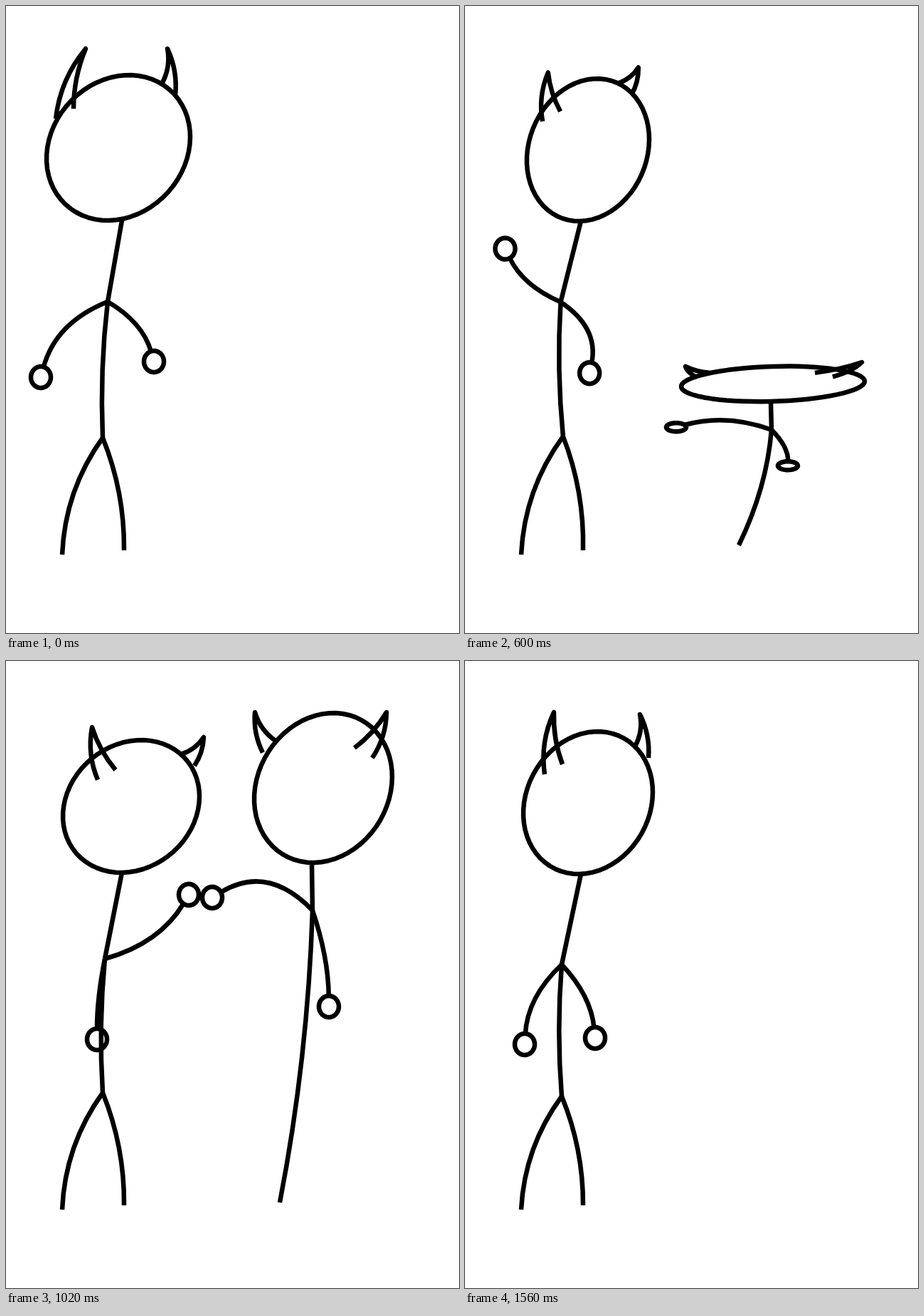
Animation of 637x880 px, one loop 1.62 s. Source, as an HTML page with a canvas:

```html
<!DOCTYPE html>
<html lang="en">
<head>
<meta charset="utf-8">
<title>Fist bump</title>
<style>
  html, body { margin: 0; width: 100%; height: 100%; overflow: hidden; background: #fff; }
  canvas { display: block; }
</style>
</head>
<body>
<canvas id="stage" width="637" height="880"></canvas>
<script>
const ctx = document.getElementById('stage').getContext('2d');
const LOOP = 1620, STEP = 60, FLOOR = 760, LEAN = 0.15;

const linear = k => k;
const snap = k => k ** 5;
const settle = k => 1 - (1 - k) ** 2;

// head: centre, radii. Horns: tip, base x. Arms: hand position, bend.
const puncher = {
  facing: 1, neck: 163, feet: [[79, 770, -0.15], [166, 764, 0.1]],
  keys: [
    { at: 0, ease: linear, head: [158, 199, 101, 102], backHorn: [112, 60, 70], frontHorn: [227, 60, 219],
      shoulder: [143, 415], hip: [136, 606], armA: [49, 521, -0.25], armB: [208, 499, 0.2] },
    { at: 240, ease: linear, head: [166, 200, 93, 99], backHorn: [109, 87, 102], frontHorn: [240, 80, 224],
      shoulder: [139, 415], hip: [137, 604], armA: [26, 349, 0.32], armB: [174, 518, 0.3] },
    { at: 420, ease: snap, head: [173, 202, 86, 100], backHorn: [116, 94, 108], frontHorn: [245, 87, 216],
      shoulder: [134, 416], hip: [138, 604], armA: [50, 341, 0.2], armB: [177, 515, 0.35] },
    { at: 780, ease: settle, head: [171, 202, 88, 100], backHorn: [142, 75, 143], frontHorn: [207, 63, 187],
      shoulder: [150, 400], hip: [135, 606], armA: [257, 328, -0.2], armB: [118, 521, -0.06] },
    { at: 1020, ease: linear, head: [176, 204, 96, 93], backHorn: [121, 93, 129], frontHorn: [278, 107, 246],
      shoulder: [139, 418], hip: [136, 606], armA: [257, 328, -0.2], armB: [128, 531, -0.05] },
    { at: 1320, ease: linear, head: [172, 199, 91, 97], backHorn: [138, 77, 125], frontHorn: [250, 73, 230],
      shoulder: [139, 402], hip: [131, 606], armA: [203, 495, -0.05], armB: [164, 520, 0.1] },
    { at: 1560, ease: linear, head: [173, 199, 91, 100], backHorn: [125, 72, 112], frontHorn: [246, 75, 239],
      shoulder: [136, 426], hip: [136, 611], armA: [84, 538, -0.2], armB: [183, 529, 0.17] }
  ]
};
const visitor = {
  facing: -1, neck: 430, feet: [],
  keys: [
    { at: 780, ease: settle, head: [433, 186, 129, 62], backHorn: [558, 110, 517], frontHorn: [310, 125, 345],
      shoulder: [431, 347], hip: [385, 752], armA: [297, 338, -0.4], armB: [454, 473, 0.1] },
    { at: 1020, ease: linear, head: [446, 178, 97, 105], backHorn: [535, 72, 515], frontHorn: [350, 72, 380],
      shoulder: [431, 350], hip: [385, 760], armA: [290, 332, -0.4], armB: [454, 485, 0.08] },
    { at: 1320, ease: linear, head: [440, 195, 125, 73], backHorn: [600, 120, 541], frontHorn: [311, 130, 358],
      shoulder: [432, 342], hip: [392, 719], armA: [338, 271, 0.32], armB: [523, 266, -0.33] }
  ]
};

function poseAt(keys, t) {
  const next = keys.findIndex(key => key.at > t);
  if (next <= 0) return keys.at(next);
  const from = keys[next - 1], to = keys[next];
  const k = from.ease((t - from.at) / (to.at - from.at));
  const pose = {};
  for (const part in from) {
    if (Array.isArray(from[part])) pose[part] = from[part].map((v, i) => v + (to[part][i] - v) * k);
  }
  return pose;
}

// Strokes a path with an even pen, even when the figure is stretched.
function ink(build, width = 6.5) {
  ctx.beginPath();
  build();
  ctx.save();
  ctx.resetTransform();
  ctx.lineWidth = width;
  ctx.stroke();
  ctx.restore();
}

const line = (...points) => ink(() => points.forEach(p => ctx.lineTo(...p)));

function oval(cx, cy, rx, ry, lean = 0) {
  ink(() => {
    for (let a = 0; a < 2 * Math.PI; a += 0.1) {
      ctx.lineTo(cx + rx * Math.cos(a), cy + ry * Math.sin(a - lean));
    }
    ctx.closePath();
  });
}

// Points along a bowed path: start, control and end, stopping short of the end if asked.
function bow([x0, y0], [x1, y1], bend, short = 0) {
  const dx = x1 - x0, dy = y1 - y0;
  const cx = x0 + dx / 2 + bend * dy, cy = y0 + dy / 2 - bend * dx;
  const k = short / Math.hypot(x1 - cx, y1 - cy);
  return [x0, y0, cx, cy, x1 + (cx - x1) * k, y1 + (cy - y1) * k];
}

function limb(...args) {
  const [x, y, ...rest] = bow(...args);
  ink(() => {
    ctx.moveTo(x, y);
    ctx.quadraticCurveTo(...rest);
  });
}

function arm(shoulder, [x, y, bend]) {
  limb(shoulder, [x, y], bend, 14);
  oval(x, y, 14, 15);
}

function horn(start, tip, end, bendUp, bendDown) {
  const up = bow(start, tip, bendUp), down = bow(tip, end, bendDown);
  ink(() => {
    ctx.moveTo(...start);
    ctx.quadraticCurveTo(...up.slice(2));
    ctx.quadraticCurveTo(...down.slice(2));
  });
}

function horns({ head: [cx, cy, rx, ry], backHorn: [bx, by, backBase], frontHorn: [fx, fy, base] }, side) {
  const backY = cy - 0.4 * ry;
  horn([backBase, backY], [bx, by], [backBase + 25 * side, backY - 14], 0.15 * side, -0.1 * side);
  const edgeY = cy - ry * Math.sin(Math.acos((base - cx) / rx) + LEAN);
  horn([base, edgeY], [fx, fy], [base + 19 * side, edgeY + 16], -0.18 * side, 0.14 * side);
}

function drawFigure({ facing, neck, feet, keys }, t) {
  const pose = poseAt(keys, t);
  const { head, shoulder, hip, armA, armB } = pose;
  oval(...head, LEAN);
  horns(pose, facing);
  line([neck, head[1] + head[3]], shoulder);
  limb(shoulder, hip, -0.04 * facing);
  arm(shoulder, armA);
  arm(shoulder, armB);
  feet.forEach(([x, y, bend]) => limb(hip, [x, y], bend));
}

// The visitor springs up from the floor and later shoots off the top.
function drawVisitor(t) {
  const rise = t < 780 ? 0.4 + 0.7 * (t - 600) / 120 : 1;
  const leave = Math.max(0, t - 1320) / 180;
  const stretch = rise * (1 + 0.5 * leave);
  ctx.save();
  ctx.translate(0, FLOOR * (1 - stretch) - 900 * leave ** 2);
  ctx.scale(1, stretch);
  drawFigure(visitor, t);
  ctx.restore();
}

function drawTrail() {
  ink(() => {
    ctx.moveTo(126, 339);
    ctx.quadraticCurveTo(180, 312, 246, 323);
  }, 23);
}

function drawBurst() {
  for (const start of [-2.36, 0.84]) {
    line(...Array.from({ length: 7 }, (_, i) => {
      const a = start + i * 0.323, r = i % 2 ? 65 : 38;
      return [282 + r * Math.cos(a), 331 + r * Math.sin(a)];
    }));
  }
}

function drawShock(t) {
  ctx.save();
  ctx.translate(440, 200);
  ctx.scale(1 + (t - 1320) / 600, 1 + (t - 1320) / 600);
  line([-171, -109], [-123, -94]);
  line([17, -133], [9, -98]);
  line([173, -112], [124, -85]);
  ctx.restore();
}

function draw() {
  const t = Math.floor(performance.now() % LOOP / STEP) * STEP;
  ctx.fillStyle = '#fff';
  ctx.fillRect(0, 0, 637, 880);
  ctx.lineJoin = 'round';
  drawFigure(puncher, t);
  if (t >= 600 && t < 1500) drawVisitor(t);
  if (t === 780) drawTrail();
  if (t >= 780 && t <= 840) drawBurst();
  if (t >= 1260 && t <= 1380) drawShock(t);
  requestAnimationFrame(draw);
}
draw();
</script>
</body>
</html>
```
